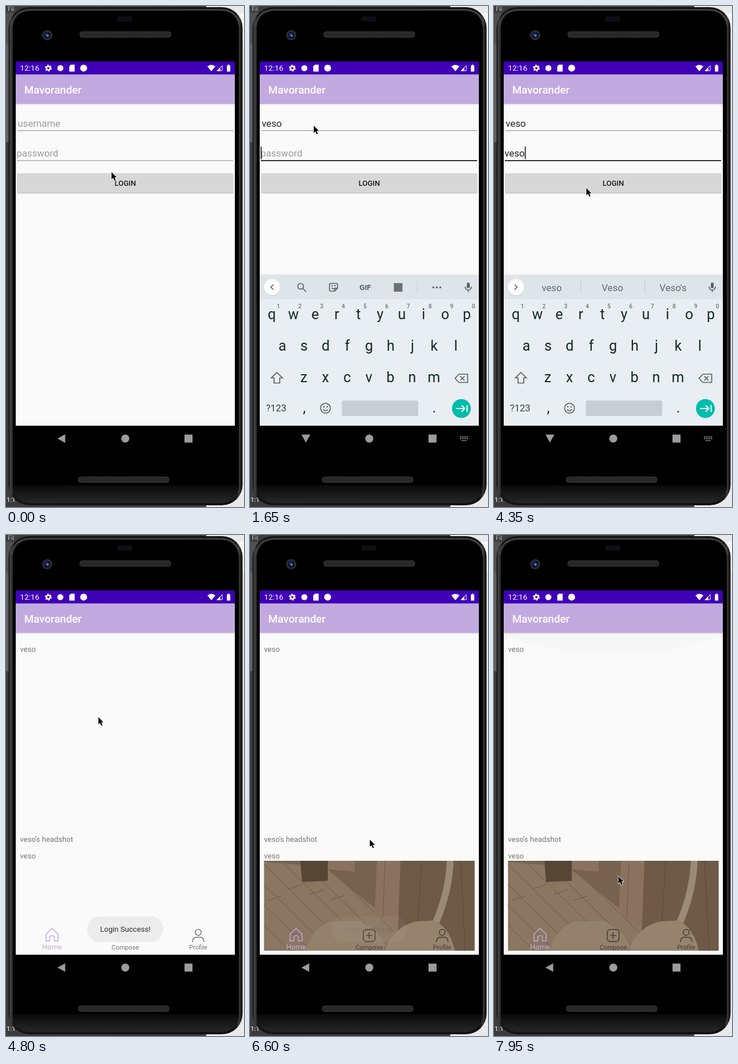
An HTML page for the animation above (8 s loop, 416 by 875 pixels).

```html
<!DOCTYPE html>
<html lang="en">
<head>
<meta charset="utf-8">
<title>Login walkthrough</title>
<style>
  html, body { margin: 0; width: 100%; height: 100%; overflow: hidden; background: #3a3a3a; }
  svg { display: block; width: 100vw; height: 100vh; }
  text { font-family: Roboto, sans-serif; white-space: pre; }
  .mid { text-anchor: middle; }
  .field { font-size: 16.8px; }
  .line { fill: none; stroke: #56636a; stroke-width: 1.7; }
  .key { font-size: 25px; fill: #14272e; }
  .digit { font-size: 10px; fill: #68747a; font-weight: 500; }
  .word { font-size: 16.8px; fill: #5f6b72; }
  .body { font-size: 13.1px; fill: #757575; }
  .tab { font-size: 11.2px; fill: #000; fill-opacity: .54; }
  .tabIcon { fill: none; stroke: #000; stroke-opacity: .54; stroke-width: 1.5; }
</style>
</head>
<body>
<svg viewBox="0 0 416 875" preserveAspectRatio="none">
  <defs>
    <clipPath id="screen"><rect x="17" y="97" width="383" height="636"/></clipPath>
    <clipPath id="content"><rect x="17" y="171" width="383" height="562"/></clipPath>
    <clipPath id="picture"><rect x="24.5" y="569" width="368" height="157"/></clipPath>
    <linearGradient id="rim">
      <stop offset="0" stop-color="#090909"/><stop offset=".008" stop-color="#454545"/>
      <stop offset=".022" stop-color="#161616"/><stop offset=".97" stop-color="#111"/>
      <stop offset=".985" stop-color="#3a3a3a"/><stop offset="1" stop-color="#080808"/>
    </linearGradient>
    <linearGradient id="chin" x2="0" y2="1">
      <stop offset="0" stop-color="#0a0a0a"/><stop offset="1" stop-color="#272727"/>
    </linearGradient>
    <linearGradient id="shade" x2="0" y2="1">
      <stop offset="0" stop-opacity=".1"/><stop offset="1" stop-opacity="0"/>
    </linearGradient>
    <pattern id="mesh" width="3" height="3" patternUnits="userSpaceOnUse">
      <rect width="3" height="3" fill="#303030"/><circle cx="1.5" cy="1.5" r=".9" fill="#131313"/>
    </pattern>
  </defs>

  <!-- desktop behind the phone -->
  <rect width="416" height="875" fill="#3c3c3c"/>
  <rect y="12" width="20" height="54" fill="#505050"/>
  <rect y="66" width="20" height="172" fill="#606060"/>
  <rect x="350" width="66" height="875" fill="#e9e9e9"/>
  <rect x="350" y="12" width="66" height="50" fill="#f7f7f7"/>
  <text x="3" y="9" font-size="11" fill="#bbb">Fil</text>
  <text x="1" y="866" font-size="11" font-weight="500" fill="#ddd">1:1</text>

  <!-- phone body -->
  <rect x="4.5" y="2" width="409" height="870" rx="36" fill="url(#rim)"/>
  <path d="M10 34Q14 7 44 6.5H374Q404 7 408 34" fill="none" stroke="#454545" stroke-width="2.500"/>
  <rect x="12" y="9" width="395" height="856" rx="30"/>
  <path d="M12 837H407V840Q405 866 376 868H42Q14 866 12 840Z" fill="url(#chin)"/>
  <rect x="194" y="18" width="27" height="9" rx="4" fill="#0d0e18"/>
  <rect x="129" y="45" width="159" height="9.5" rx="4" fill="url(#mesh)" stroke="#3e3e3e"/>
  <rect x="126.500" y="822.5" width="158.500" height="9.5" rx="4" fill="url(#mesh)" stroke="#3e3e3e"/>
  <circle cx="72" cy="51" r="9" fill="#2d2d32"/>
  <circle cx="72" cy="51" r="6" fill="#0d1430"/>
  <circle cx="71.5" cy="50.500" r="3" fill="#263c80"/>
  <circle cx="73" cy="52" r="1.3" fill="#a9baf0"/>

  <g clip-path="url(#screen)">
    <rect x="17" y="97" width="383" height="636" fill="#fafafa"/>

    <g id="login">
      <text id="userText" class="field" x="20.500" y="210.5"></text>
      <text id="passText" class="field" x="18.5" y="262.5"></text>
      <rect id="userLine" x="20" width="377"/>
      <rect id="passLine" x="19" width="378"/>
      <rect id="compose" height="1" fill="#444"/>
      <rect id="caret" width="1.6" height="22" fill="#111"/>
      <rect x="19.5" y="292.5" width="378" height="35" rx="2" fill="#c4c4c4"/>
      <rect id="button" x="20" y="292" width="377" height="34" rx="2"/>
      <text class="mid" x="208.5" y="314" font-size="13" font-weight="500" fill="#1c1c1c">LOGIN</text>
    </g>

    <g id="feed">
      <rect x="17" y="171" width="383" height="562" fill="#fafafa"/>
      <text class="body" x="24.5" y="203.5">veso</text>
      <text class="body" x="24.5" y="536">veso's headshot</text>
      <text class="body" x="24.5" y="564.5">veso</text>
      <g id="photo" clip-path="url(#picture)">
        <rect x="24" y="569" width="369" height="157" fill="#8a7661"/>
        <g id="planks" stroke="#6b5845" fill="none"></g>
        <path d="M24 569H88V576L24 571ZM136 569H222V655L136 585Z" fill="#77624f"/>
        <path d="M88 569H136V604L91 606Z" fill="#574536"/>
        <path d="M136 569H183V588L136 584Z" fill="#8a735e"/>
        <path d="M222 569H263L257 684L218 662Z" fill="#8a735e"/>
        <path d="M236 569L232 670" stroke="#715b48" fill="none"/>
        <path d="M263 569H393V726H257Z" fill="#6f5947"/>
        <path d="M300 569L292 700M368 569L376 726" stroke="#5e4938" fill="none"/>
        <path d="M350 565Q349 622 323 681" stroke="#9b8a76" stroke-width="12" fill="none"/>
        <path d="M98 726Q104 692 139 675L190 674Q218 685 237 714L231 726Z" fill="#93816c"/>
        <path d="M238 718Q256 683 289 675L323 673Q350 688 358 726H238Z" fill="#95836e"/>
      </g>
      <path d="M70 697L80.5 687L91 697V709H84.500V701.5Q80.5 698 76.5 701.500V709H70Z" fill="none" stroke="#c2aae0" stroke-width="1.5"/>
      <text class="mid" x="80.5" y="724" font-size="13" fill="#c2aae0">Home</text>
      <g class="tabIcon">
        <rect x="198" y="689" width="20.500" height="21" rx="5"/>
        <path d="M208.2 694V705M202.700 699.5H213.700"/>
        <circle cx="336" cy="694" r="5.2"/>
        <path d="M326 711Q326 702.500 332.500 702.500H339.500Q346 702.500 346 711"/>
      </g>
      <text class="tab mid" x="208.5" y="724">Compose</text>
      <text class="tab mid" x="336" y="724">Profile</text>
      <g clip-path="url(#content)"><ellipse id="glow" cx="208" cy="120" rx="240" ry="89"/></g>
    </g>

    <g id="toast">
      <rect x="142" y="666" width="133" height="45" rx="22.5" fill="#ececec"/>
      <text class="mid" x="208.5" y="693" font-size="13.1" fill="#222">Login Success!</text>
    </g>

    <rect x="17" y="171" width="383" height="3" fill="url(#shade)"/>
    <rect x="17" y="119" width="383" height="52" fill="#c2aae0"/>
    <text x="32" y="152.700" font-size="18.7" font-weight="500" fill="#fff">Mavorander</text>
    <rect x="17" y="97" width="383" height="22.5" fill="#4000b8"/>
    <g fill="#fff">
      <text x="24.500" y="113" font-size="13.6">12:16</text>
      <circle cx="74" cy="108.500" r="3.3" fill="none" stroke="#fff" stroke-width="2.6"/>
      <circle cx="74" cy="108.500" r="5" fill="none" stroke="#fff" stroke-width="2" stroke-dasharray="2.6 2.636"/>
      <circle cx="95" cy="108.500" r="5.300"/>
      <path d="M113.500 102.500H120V114.500H110.500V105.500Z"/>
      <circle cx="135.700" cy="108.500" r="6"/>
      <path d="M352 105.500Q359 100 366 105.500L359 114Z"/>
      <path d="M369 113L378 104V113Z" fill="none" stroke="#fff"/>
      <path d="M368 113.500L374.500 107V113.500Z"/>
      <path d="M386 104H387.500V102.500H390.500V104H392V114.500H386Z"/>
    </g>

    <g id="keyboard">
      <rect x="17" y="468" width="383" height="2" fill="#eee"/>
      <rect x="17" y="470" width="383" height="264" fill="#e9eef2"/>
      <rect x="17" y="470" width="383" height="42" fill="#dfe4e8"/>
      <circle cx="38.500" cy="491.700" r="14.200" fill="#cbd0d4"/>
      <circle cx="38.500" cy="491" r="14" fill="#fff"/>
      <path id="chevron" class="line"/>
      <g id="tools">
        <circle class="line" cx="88.500" cy="489.500" r="5"/><path class="line" d="M92 493L98 499" stroke-width="2.2"/>
        <path class="line" d="M140.500 484.500H151.500Q153 484.500 153 486V493L148 498H140.500Q139 498 139 496.500V486Q139 484.500 140.500 484.500M153 493H148V498M142.500 492Q146 496 149.500 492"/>
        <circle cx="143.500" cy="488.500" r="1.2" fill="#56636a"/><circle cx="148.500" cy="488.500" r="1.2" fill="#56636a"/>
        <text class="mid" x="201.500" y="496" font-size="13.500" font-weight="700" fill="#56636a">GIF</text>
        <rect x="251.500" y="484" width="15" height="15" fill="#66737a"/>
        <path d="M292.500 481V502" stroke="#c9ced2"/>
        <path d="M320.500 491.500H334" stroke="#56636a" stroke-width="3.400" stroke-linecap="round" stroke-dasharray="0 6"/>
      </g>
      <g id="words">
        <path d="M151.500 481V502M263.500 481V502" stroke="#c3c9cd"/>
        <text class="word mid" x="101" y="497.500"></text>
        <text class="word mid" x="207" y="497.500"></text>
        <text class="word mid" x="313" y="497.500"></text>
      </g>
      <rect x="379" y="483" width="5" height="10" rx="2.500" fill="#56636a"/>
      <path class="line" d="M376 490Q376.500 496 381.500 496T387 490M381.500 496V499.500"/>
      <g id="keys"></g>
      <path class="line" d="M47 640L56.500 649.500H52V658.500H42V649.500H37.500Z"/>
      <path class="line" d="M365 643H380.500V657.500H365L358.500 650.200ZM367.500 646.500L375 654M375 646.500L367.500 654"/>
      <text x="28" y="708" font-size="16.500" fill="#33444b">?123</text>
      <text class="key mid" x="95" y="710">,</text>
      <text class="key mid" x="322" y="710">.</text>
      <circle class="line" cx="132" cy="702.500" r="8.600"/>
      <path class="line" d="M127.500 704.500Q132 710 136.500 704.500"/>
      <circle cx="129" cy="700" r="1.300" fill="#56636a"/><circle cx="135" cy="700" r="1.300" fill="#56636a"/>
      <rect x="160.500" y="689" width="133.500" height="27" rx="3" fill="#c8cdd1"/>
      <circle cx="369.500" cy="703" r="16.500" fill="#00bdad"/>
      <path d="M360 703H375M370 697.500L375.500 703L370 708.500M379.500 697V709" fill="none" stroke="#fff" stroke-width="2"/>
    </g>
  </g>

  <g fill="#9c9c9c">
    <path id="back"/>
    <circle cx="208.500" cy="755.500" r="7"/>
    <rect x="312" y="748.500" width="14" height="14" rx=".5"/>
    <path id="kbIcon" d="M367 752.500H382M367 755.500H382M370 759H379" stroke="#999" stroke-width="1.800" stroke-dasharray="1.800 1.300"/>
  </g>
  <path id="pointer" d="M.5 1V13.700L3.300 11L5.600 16L7.700 15L5.500 10.200H9.300Z" stroke="#fff" stroke-width="1.400" paint-order="stroke"/>
</svg>

<script>
const LOOP = 8000, STEP = 150, NAME = 'veso';
const $ = id => document.getElementById(id);
const set = (el, attrs) => { for (const k in attrs) el.setAttribute(k, attrs[k]); };
const show = (el, on) => set(el, { visibility: on ? 'visible' : 'hidden' });
const add = (parent, tag, attrs, text = '') => {
  const el = document.createElementNS('http://www.w3.org/2000/svg', tag);
  set(el, attrs);
  el.textContent = text;
  parent.append(el);
};

// Key rows: letters, first centre, baseline
[['qwertyuiop', 38, 547], ['asdfghjkl', 56.5, 602], ['zxcvbnm', 94, 657]].forEach(([row, x, y], r) => {
  [...row].forEach((letter, i) => {
    const cx = x + i * 37.9;
    add($('keys'), 'text', { class: 'key mid', x: cx, y }, letter);
    if (r === 0) add($('keys'), 'text', { class: 'digit mid', x: cx + 11.5, y: 528 }, (i + 1) % 10);
  });
});

for (let i = 0; i < 7; i++) {
  const x = i * 36 - 90;
  add($('planks'), 'path', { d: `M${x} 569L${x + 160} 726M${x + 50} ${618 + i % 3 * 10}l24 -8` });
}

// Eased value from [time, value] pairs, constant outside them
function track(t, keys) {
  let [t0, v0] = keys[0];
  for (const [t1, v1] of keys) {
    if (t < t1) {
      const p = Math.max(0, (t - t0) / (t1 - t0));
      return v0 + (v1 - v0) * p * p * (3 - 2 * p);
    }
    [t0, v0] = [t1, v1];
  }
  return v0;
}

// Latest value from [time, value] pairs
const at = (t, keys) => keys.reduce((v, [time, next]) => t >= time ? next : v, keys[0][1]);

function drawField(text, value, hint) {
  text.textContent = value || hint;
  text.setAttribute('fill', value ? '#222' : '#9b9b9b');
  return value ? text.getComputedTextLength() : 0;
}

function drawLine(el, y, focused) {
  set(el, focused ? { y: y - .6, height: 1.8, fill: '#1e1e1e' } : { y: y - .3, height: 1, fill: '#868686' });
}

function render(t) {
  const user = NAME.slice(0, at(t, [[0, 0], [900, 1], [1200, 3], [1350, 4]]));
  const pass = NAME.slice(0, at(t, [[0, 0], [2250, 1], [2400, 2], [2550, 3], [2700, 4]]));
  const focus = at(t, [[0, ''], [450, 'user'], [1650, 'pass']]);
  const onPass = focus === 'pass';
  const inFeed = t >= 4650;

  const userWidth = drawField($('userText'), user, 'username');
  const passWidth = drawField($('passText'), pass, 'password');
  drawLine($('userLine'), 217.5, focus === 'user');
  drawLine($('passLine'), 269.8, onPass);

  const width = onPass ? passWidth : userWidth;
  const left = onPass ? 18.5 : 20.5;
  set($('caret'), { x: left + width + .2, y: onPass ? 245.5 : 193.5 });
  show($('caret'), focus && !inFeed && !(t >= 3750 && t < 4200));
  set($('compose'), { x: left, y: onPass ? 264 : 212, width });
  show($('compose'), width && t < 3150);
  set($('button'), { fill: at(t, [[0, '#d6d7d6'], [3450, '#c9cac9'], [3600, '#cfd0cf'], [3750, '#d6d7d6']]) });

  const drop = at(t, [[0, 270], [600, 130], [750, 0], [4500, 150], [4650, 270]]);
  const raised = drop < 270;
  set($('keyboard'), { transform: `translate(0 ${drop})` });
  show($('keyboard'), raised);
  const word = t < 1050 ? '' : onPass ? pass : user;
  show($('tools'), raised && !word);
  show($('words'), raised && word);
  const title = word && word[0].toUpperCase() + word.slice(1);
  [word, title, title + "'s"].forEach((s, i) => $('words').querySelectorAll('text')[i].textContent = s);
  set($('chevron'), { d: word ? 'M36 486.500L40.500 491L36 495.500' : 'M41 486.500L36.500 491L41 495.500' });
  set($('back'), { d: raised ? 'M90 748.500H105.500L97.700 762.500Z' : 'M90 755.500L103.500 748V763Z' });
  show($('kbIcon'), raised);

  show($('login'), !inFeed);
  set($('feed'), { opacity: at(t, [[0, 0], [4650, .6], [4800, 1]]) });
  set($('toast'), { opacity: at(t, [[0, 0], [4650, .4], [4800, .95], [6450, .5], [6600, .05], [6750, 0]]) });
  set($('photo'), { opacity: at(t, [[0, 0], [6000, .35], [6150, .7], [6300, 1]]) });
  set($('glow'), { opacity: track(t, [[6600, 0], [7650, .012]]) });

  const x = track(t, [[0, 184], [450, 111], [2700, 111], [3150, 161], [5400, 161], [6300, 209], [6600, 209], [7950, 217]]);
  const y = track(t, [[0, 289], [450, 208], [2700, 208], [3150, 317], [5400, 317], [6300, 531], [6600, 531], [7950, 595]]);
  set($('pointer'), { transform: `translate(${x} ${y})` });
}

const start = performance.now();
function frame() {
  const t = (performance.now() - start) % LOOP;
  render(Math.floor(t / STEP) * STEP);
  requestAnimationFrame(frame);
}
frame();
</script>
</body>
</html>
```
